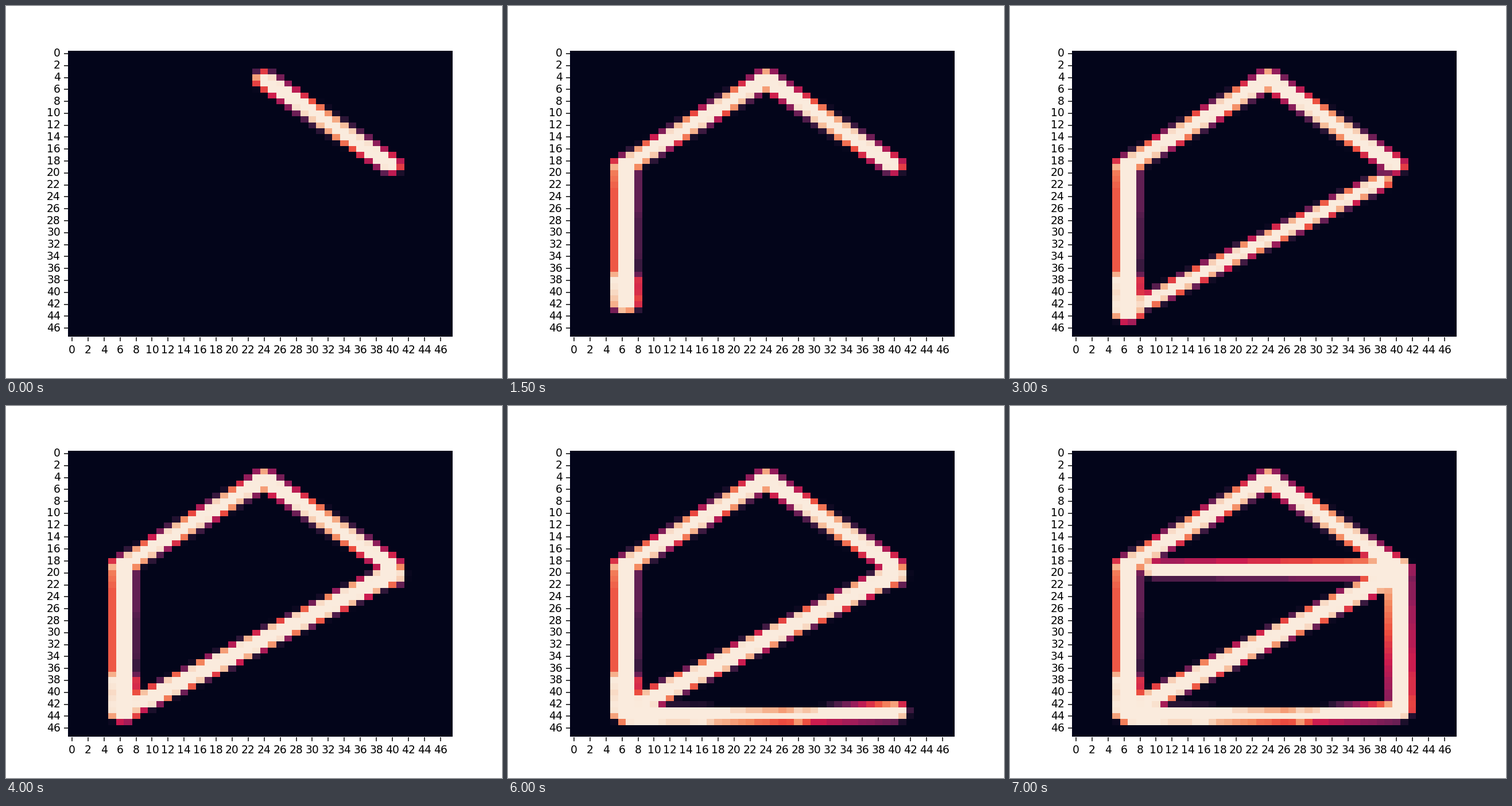
Write a matplotlib script that moves like this. It is 864 px wide and 648 px high and loops after 7.5 s.

```python
import numpy as np
import matplotlib.pyplot as plt
from matplotlib.animation import FuncAnimation
from matplotlib.colors import LinearSegmentedColormap

SIZE = 48   # cells per side
SUB = 20    # subsamples per cell side

ROCKET = LinearSegmentedColormap.from_list(
    "rocket", "#03051a #30173a #611f53 #961c5b #cb1b4f "
              "#ec4c3e #f4875e #f6bc99 #faebdd".split())

# Corners of the house, in cells
APEX = 24.5, 4.75
EAVE_L, EAVE_R = (6.8, 19.3), (40.3, 19.15)
FOOT, BASE_L = (6.75, 38.6), (6.9, 43.7)
SLANT, MEET = (9.4, 42.0), (38.7, 21.85)
JOIN, BEAM_R, BEAM_L = (40.1, 20.9), (40.7, 19.8), (10.1, 19.9)
SILL_L, SILL_MID = (7.6, 44.45), (28.6, 44.4)
SILL_R, WALL_R = (40.65, 43.72), (41.15, 43.1)


def linear(s):
    return s


def slow_down(s):
    return 1 - (1 - s) ** 3


def speed_up(s):
    return s ** 2.2


def strokes(start, end, radii, ease=linear):
    """Split a line into one stroke per step between pen radii."""
    t = ease(np.linspace(0, 1, len(radii)))[:, None]
    points = np.array(start) * (1 - t) + np.array(end) * t
    pen = np.column_stack([points, radii])
    return list(zip(pen, pen[1:]))


def coverage(start, end):
    """Share of each cell covered by a tapered round-capped stroke."""
    (x0, y0, r0), (x1, y1, r1) = start, end
    axis = (np.arange(SIZE * SUB) + 0.5) / SUB
    x, y = np.meshgrid(axis, axis)
    dx, dy = x1 - x0, y1 - y0
    t = np.clip(((x - x0) * dx + (y - y0) * dy) / (dx**2 + dy**2), 0, 1)
    dist = np.hypot(x - x0 - t * dx, y - y0 - t * dy)
    inside = dist < r0 + t * (r1 - r0)
    return inside.reshape(SIZE, SUB, SIZE, SUB).mean(axis=(1, 3))


def snapped_edges(first, length):
    """Cell edges rounded to the pixels of a 640 x 480 raster."""
    step = length / SIZE
    pixels = np.round(first + step * np.arange(SIZE + 1))
    return (pixels - first) / step


drawing = (
    strokes(EAVE_R, APEX, [1.37, 1.37])
    + strokes(APEX, EAVE_L, [1.36, 1.36])
    + strokes(EAVE_L, FOOT, [1.48, 1.4])
    + strokes(FOOT, BASE_L, [1.75] * 4, slow_down)
    + strokes(SLANT, MEET, [1.2, 1.2])
    + strokes(MEET, JOIN, [1.3, 1.95])
    + strokes(MEET, SLANT, [1.42, 1.42])
    + strokes(SILL_L, SILL_MID, [1.55, 1.55, 1.5, 1.16], speed_up)
    + strokes(SILL_MID, SILL_R, [1.16, 1.55])
    + strokes(WALL_R, BEAM_R, [1.45, 1.6])
    + strokes(BEAM_R, BEAM_L, [1.55, 1.28])
)
layers = np.array([coverage(*s) for s in drawing])
canvases = 1 - np.cumprod(1 - layers, axis=0)

fig, ax = plt.subplots(figsize=(6.4, 4.8), dpi=135)
mesh = ax.pcolormesh(snapped_edges(80, 496), snapped_edges(57.6, 369.6),
                     canvases[0], cmap=ROCKET, vmin=0, vmax=1)
ax.set(xlim=(0, SIZE), ylim=(SIZE, 0))
ax.spines[:].set_visible(False)
ticks = np.arange(0, SIZE, 2)
ax.set_xticks(ticks + 0.5, ticks)
ax.set_yticks(ticks + 0.5, ticks, va="center")


def update(i):
    mesh.set_array(canvases[i])
    return [mesh]


anim = FuncAnimation(fig, update, frames=len(drawing), interval=500,
                     repeat=True, repeat_delay=0)
plt.show()
```
